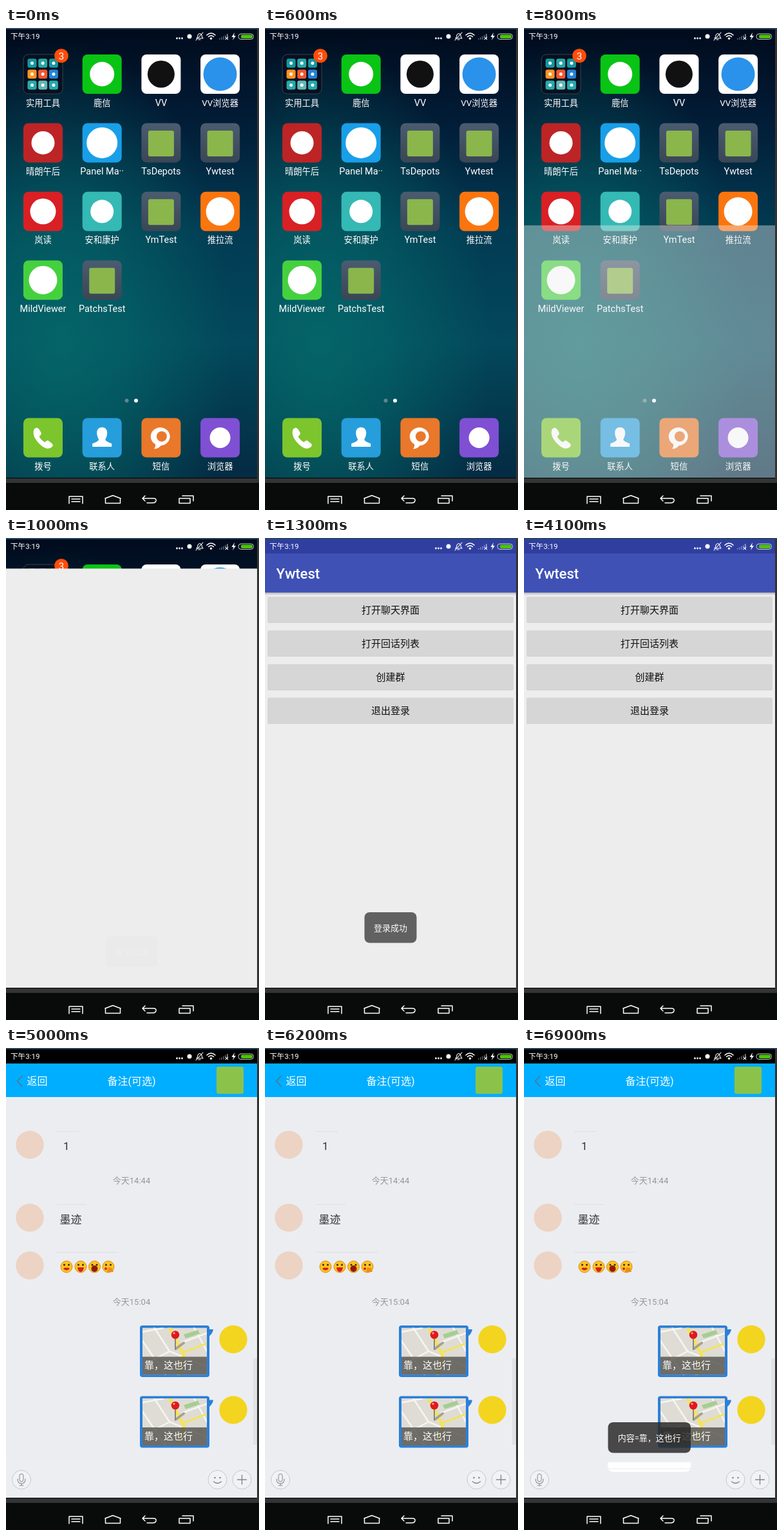
Write an HTML page that moves like this. It is 393 px wide and 747 px high and loops after 8 s.

```html
<!DOCTYPE html>
<html lang="zh-CN">
<head>
<meta charset="utf-8">
<title>Phone demo</title>
<style>
html, body { margin: 0; width: 100%; height: 100%; overflow: hidden; background: #333; }
svg { display: block; width: 393px; height: 747px; font-family: Roboto, "Noto Sans CJK SC", "Noto Sans CJK", sans-serif; }
.mid { text-anchor: middle; }
.line { fill: none; stroke: #fff; stroke-linecap: round; stroke-linejoin: round; }
</style>
</head>
<body>
<svg id="stage" viewBox="0 0 393 747" xmlns="http://www.w3.org/2000/svg"></svg>
<script>
const LOOP = 8000, STEP = 100;

const rect = (x, y, w, h, fill, r = 0, more = '') =>
  `<rect x="${x}" y="${y}" width="${w}" height="${h}" rx="${r}" fill="${fill}" ${more}/>`;
const circle = (x, y, r, fill, more = '') => `<circle cx="${x}" cy="${y}" r="${r}" fill="${fill}" ${more}/>`;
const path = (d, fill, more = '') => `<path d="${d}" fill="${fill}" ${more}/>`;
const line = (d, width = 1.5, color = '#fff') =>
  `<path class="line" d="${d}" style="stroke:${color};stroke-width:${width}"/>`;
const text = (s, x, y, size, fill = '#fff', more = '') =>
  `<text x="${x}" y="${y}" font-size="${size}" fill="${fill}" ${more}>${s}</text>`;
const mid = 'class="mid"';
const group = (id, body) => `<g id="${id}">${body}</g>`;
const at = (x, y, body) => `<g transform="translate(${x} ${y})">${body}</g>`;

// Home screen: glyphs are drawn around the centre of a 61px tile.
const dot = (color, r = 19) => circle(0, 0, r, color);
const folder = ['#1797a0', '#2aa5a5', '#1797a0', '#ff9420', '#f4572e', '#2384d8', '#27a9ad', '#62b8b8', '#27a9ad']
  .map((c, i) => rect(-24 + i % 3 * 16.7, -24 + (i / 3 | 0) * 17, 14, 14, c, 3) +
    circle(-17 + i % 3 * 16.7, -17 + (i / 3 | 0) * 17, 2.5, '#fff')).join('');
const handset = path('M-14-13q4-5 8 0l3 5q1 3-3 6q3 6 9 9q3-4 6-2l5 4q3 3-1 6q-7 5-17-4q-14-13-10-24Z', '#fff');
const person = path('M-8-8C-8-19 8-19 8-8C8-2 6 0 5 3Q6 6 15 9V14H-15V9Q-6 6-5 3C-6 0-8-2-8-8Z', '#fff');
const speech = path('M-9 10A15 14 0 1 1 0 12Q-5 18-11 17Q-8 14-9 10Z', '#fff') + circle(1, -2, 8, '#e9782a');
const sample = ['url(#slate)', rect(-20, -19, 40, 40, '#8ab64c', 3)];

const apps = [
  ['实用工具', '#07101f', folder], ['鹿信', '#09c414', dot('#fff')],
  ['VV', '#fff', dot('#111', 21)], ['VV浏览器', '#fff', dot('#2a92ea', 26)],
  ['晴朗午后', '#bd2426', dot('#fff', 18)], ['Panel Ma··', '#189fe8', dot('#fff', 24)],
  ['TsDepots', ...sample], ['Ywtest', ...sample],
  ['岚读', '#d92024', dot('#fff', 20)], ['安和康护', '#35b9b5', dot('#fff', 18)],
  ['YmTest', ...sample], ['推拉流', '#fb750f', dot('#fff', 22)],
  ['MildViewer', '#45d13e', dot('#fff', 22)], ['PatchsTest', ...sample]
];
const dock = [
  ['拨号', '#7cc52d', handset], ['联系人', '#269edc', person],
  ['短信', '#e9782a', speech], ['浏览器', '#7f50d3', dot('#fff', 16)]
];
const column = i => 57.5 + i % 4 * 91.7;
const icon = ([label, color, glyph], i, top) => at(column(i), top + 30.5,
  rect(-30.5, -30.5, 61, 61, color, 8, glyph === folder ? 'stroke="#38424e"' : '') + glyph +
  text(label, 0, 49, /^[\x00-\xff]+$/.test(label) ? 14.5 : 13.3, '#fff', mid));

const home = rect(0, 2, 390, 695, 'url(#sky)') + rect(0, 2, 390, 695, 'url(#glow)') +
  apps.map((a, i) => icon(a, i, 41 + (i / 4 | 0) * 106.4)).join('') +
  dock.map((a, i) => icon(a, i, 604.5)).join('') +
  circle(86, 43, 10.8, '#ff4d08') + text('3', 86, 48.5, 15, '#fff', mid) +
  circle(187.5, 577.5, 3, '#62868c') + circle(202, 577.5, 3, '#fff');

// App menu
const button = (label, i) => {
  const y = 91 + i * 52.2;
  return rect(4, y + 1.5, 382, 39, '#000', 2, 'opacity=".13"') + rect(4, y, 382, 39.5, '#d6d6d7', 2) +
    (i ? '' : `<g clip-path="url(#press)">${circle(195, 111, 0, '#000', 'id="ripple"')}</g>`) +
    text(label, 195, y + 25.5, 15, '#111', mid);
};
const menu = rect(0, 2, 390, 695, '#ededed') + rect(0, 84, 390, 5, 'url(#shade)') +
  rect(0, 2, 390, 22, '#303f9f') + rect(0, 24, 390, 60.5, '#3f51b5') +
  text('Ywtest', 17.5, 63, 22, '#fff', 'font-weight="500"') +
  ['打开聊天界面', '打开回话列表', '创建群', '退出登录'].map(button).join('');

// Chat
const bubble = (y, w) => circle(37, y + 21, 21.7, '#ecd3c3') + rect(78, y, w, 1, '#dcdfe4');
const face = (x, extra) => at(x, 339,
  circle(0, 0, 9, '#fdc420', 'stroke="#d98b14"') + circle(-3.5, -3, 1.5, '#40200a') + circle(3.5, -3, 1.5, '#40200a') + extra);
const emoji = face(94, path('M-5 3Q-2 0 0 2Q2 0 5 3Q0 8-5 3Z', '#d61f26')) +
  face(116, path('M-5 1H5Q4 8 0 8T-5 1Z', '#d61f26')) +
  face(137.5, circle(0, 3, 5, '#8d1a12')) +
  face(159, path('M-2 8L0 1L6 2L8 8Z', '#f08c1a') + circle(-4, 3, 2, '#d61f26'));

const card = y => at(208, y,
  path('M104 6H114Q113 13 106 18Z', '#2b80d9') + rect(0, 0, 108, 80, '#2b80d9', 4) +
  `<g clip-path="url(#map)">` + rect(4, 3.5, 100, 73, '#dfdcd6') +
  line('M4 24L40 77M4 10L36 4M22 3L46 40L104 64M46 40L4 62', 2.5, '#f6f5f1') +
  line('M66 26L104 12M84 3L104 40', 2.5, '#f6f5f1') +
  line('M46 3L68 46L60 77', 5, '#f3e45c') + line('M66 42L104 28', 3, '#f3e45c') +
  path('M68 14L90 7L93 13L71 20Z', '#a5ce91') +
  line('M56 36L68 27', 4, '#a7a28b') + line('M55 18V37', 2, '#858585') +
  circle(55, 14.5, 6.3, '#e0191c') + circle(53, 12, 1.8, '#ff8d88') +
  rect(4, 48.5, 100, 28, '#56544f', 0, 'opacity=".82"') + '</g>' +
  text('靠，这也行', 7, 67, 15)) + circle(353, y + 21.5, 21.7, '#f3d51f');

const tool = (x, glyph) => at(x, 669, circle(0, 0, 14.5, '#f1f2f5', 'stroke="#c6c8cc"') + glyph);
const gray = '#85878b';
const chat = rect(0, 2, 390, 695, '#ebedf1') + rect(0, 2, 390, 22, '#000') + rect(0, 24, 390, 52, '#00aeff') +
  line('M25 43.5L17.5 51.5L25 59.5', 1.8, '#497b98') + text('返回', 32.5, 57, 16) +
  text('备注(可选)', 195, 57, 16, '#fff', mid) + rect(327, 29, 42, 42, '#8bc34a', 3) +
  bubble(129, 35) + text('1', 89, 158, 17, '#333') +
  text('今天14:44', 195, 210, 13, '#94979d', mid) +
  bubble(242, 47) + text('墨迹', 83.5, 271.5, 17, '#333') +
  bubble(316, 97) + emoji +
  text('今天15:04', 195, 397.5, 13, '#94979d', mid) +
  card(430) + card(539.5) +
  rect(0, 640, 390, 57, '#edeef1') +
  tool(24, rect(-3, -9, 6, 12, 'none', 3, `stroke="${gray}"`) + line('M-6-1Q-6 6 0 6T6-1M0 6V9M-3 9H3', 1.1, gray)) +
  tool(328.5, circle(-4, -3, 1.3, gray) + circle(4, -3, 1.3, gray) + line('M-6 3Q0 8 6 3', 1.4, gray)) +
  tool(366.5, line('M-7 0H7M0-7V7', 1.4, gray)) +
  rect(384, 481, 6, 134, '#a6a9ae', 0, 'id="scroll"') +
  group('trail', path('M130 642H259V649Q258 657 250 657H139Q131 657 130 649Z', '#fff') + rect(130, 651.5, 129, 1, '#ebecef'));

const status = text('下午3:19', 7, 17, 11.6) +
  [265.5, 269.5, 273.5].map(x => circle(x, 16, 1.4, '#fff')).join('') + circle(285, 13, 3.5, '#fff') +
  line('M296 16Q298 14 298 11Q301 6 304 11Q304 14 306 16ZM299 18H302M306 7L295 19', 1.1) +
  line('M312 11Q318.5 5 325 11M314.5 13.5Q318.5 10 322.5 13.5', 1.6) + circle(318.5, 16.2, 1.7, '#fff') +
  [0, 1, 2, 3, 4].map(i => rect(331 + i * 3, 16 - i * 1.7, 1.5, 2 + i * 1.7, '#fff', 0, `opacity="${i < 4 ? .35 : .6}"`)).join('') +
  line('M341 14L345 18M345 14L341 18', 1) +
  path('M355 7L350.5 14H353.5L352 19L357 12H354Z', '#fff') +
  rect(361, 9, 23.5, 8.5, 'none', 4, 'stroke="#ccc"') + rect(365, 10.5, 18, 5.5, '#48c800', 2);

const frame = rect(390, 0, 3, 705, '#333') + rect(0, 0, 393, 2, '#28475f') + rect(0, 697, 393, 8, '#333436') +
  rect(0, 697, 390, 1, '#000') + rect(0, 705, 393, 42, '#090b0b') +
  line('M98 737V726H119V737M102 730H115M102 734H115') +
  line('M154 729L166 724.5L178 729M154.5 729V736.5H177.5V729') +
  line('M216 725L212 729L216 733M212 729H229Q234 729 233 733Q232 736 228 736H219') +
  line('M269 729H286V736.5H269ZM274 725H291V733');

const toast = (id, x, w, label) => group(id,
  rect(x, 580, w, 47.5, '#292929', 8, 'opacity=".84"') + text(label, x + w / 2, 609, 13, '#fff', mid));

const stops = list => list.map(([o, c, a = 1]) => `<stop offset="${o}" stop-color="${c}" stop-opacity="${a}"/>`).join('');
const linear = (id, list) => `<linearGradient id="${id}" x2="0" y2="1">${stops(list)}</linearGradient>`;

document.getElementById('stage').innerHTML = '<defs>' +
  linear('sky', [[0, '#010b1d'], [.2, '#021c36'], [.45, '#023b53'], [.7, '#03485c'], [1, '#042b43']]) +
  linear('slate', [[0, '#4b5c70'], [1, '#3a4655']]) +
  linear('shade', [[0, '#000', .25], [1, '#000', 0]]) +
  `<radialGradient id="glow" cx=".22" cy=".7" r=".68">${stops([[0, '#046c6b', .8], [.4, '#046c6b', .55], [1, '#046c6b', 0]])}</radialGradient>` +
  `<clipPath id="press">${rect(4, 91, 382, 39.5, '#000', 2)}</clipPath>` +
  `<clipPath id="map">${rect(4, 3.5, 100, 73, '#000')}</clipPath>` +
  `<clipPath id="screen">${rect(0, 2, 390, 695, '#000')}</clipPath></defs>` +
  '<g clip-path="url(#screen)">' + group('home', home) +
  group('opening', rect(0, 2, 390, 695, '#ededed')) + group('menu', menu) + group('chat', chat) +
  toast('loginToast', 154.5, 81, '登录成功') + toast('textToast', 130.5, 128.5, '内容=靠，这也行') +
  status + '</g>' + frame;

const $ = id => document.getElementById(id);
const show = (id, on) => { $(id).style.display = on ? '' : 'none'; };

// Linear interpolation through [time, value] pairs.
function track(t, keys) {
  if (t <= keys[0][0]) return keys[0][1];
  for (let i = 1; i < keys.length; i++) {
    const [t0, v0] = keys[i - 1], [t1, v1] = keys[i];
    if (t <= t1) return v0 + (v1 - v0) * (t - t0) / (t1 - t0);
  }
  return keys[keys.length - 1][1];
}

const RISE = [[0, 37], [100, 24], [200, 10], [300, 0], [400, -4], [500, -2], [600, 0]];
const APPEAR = [[-1, 0], [0, .012], [100, .3], [200, .6], [300, .85], [400, 1]];
function moveToast(id, age, fade = 1) {
  $(id).setAttribute('transform', `translate(0 ${track(age, RISE)})`);
  $(id).setAttribute('opacity', track(age, APPEAR) * fade);
}

function render(t) {
  show('home', t < 1200);
  show('opening', t >= 600 && t < 1200);
  show('menu', t >= 1200 && t < 4400);
  show('chat', t >= 4400);
  show('trail', t >= 6600);

  const left = 1 - Math.min(1, Math.max(0, (t - 633) / 493));
  $('opening').setAttribute('transform', `translate(0 ${695 * left * left})`);
  $('opening').setAttribute('opacity', track(t, [[633, 0], [800, .4], [1000, 1]]));

  $('ripple').setAttribute('r', track(t, [[3100, 0], [3200, 70], [3400, 195]]));
  $('ripple').setAttribute('opacity', track(t, [[3100, 0], [3200, .12], [3400, .12], [3600, 0]]));
  $('scroll').setAttribute('opacity', track(t, [[4600, .8], [5000, .17]]));

  moveToast('loginToast', t - 1000, track(t, [[2500, 1], [3000, 0]]));
  moveToast('textToast', t - 6300);
}

function tick(now) {
  render(Math.floor(now % LOOP / STEP) * STEP);
  requestAnimationFrame(tick);
}
render(0);
requestAnimationFrame(tick);
</script>
</body>
</html>
```
